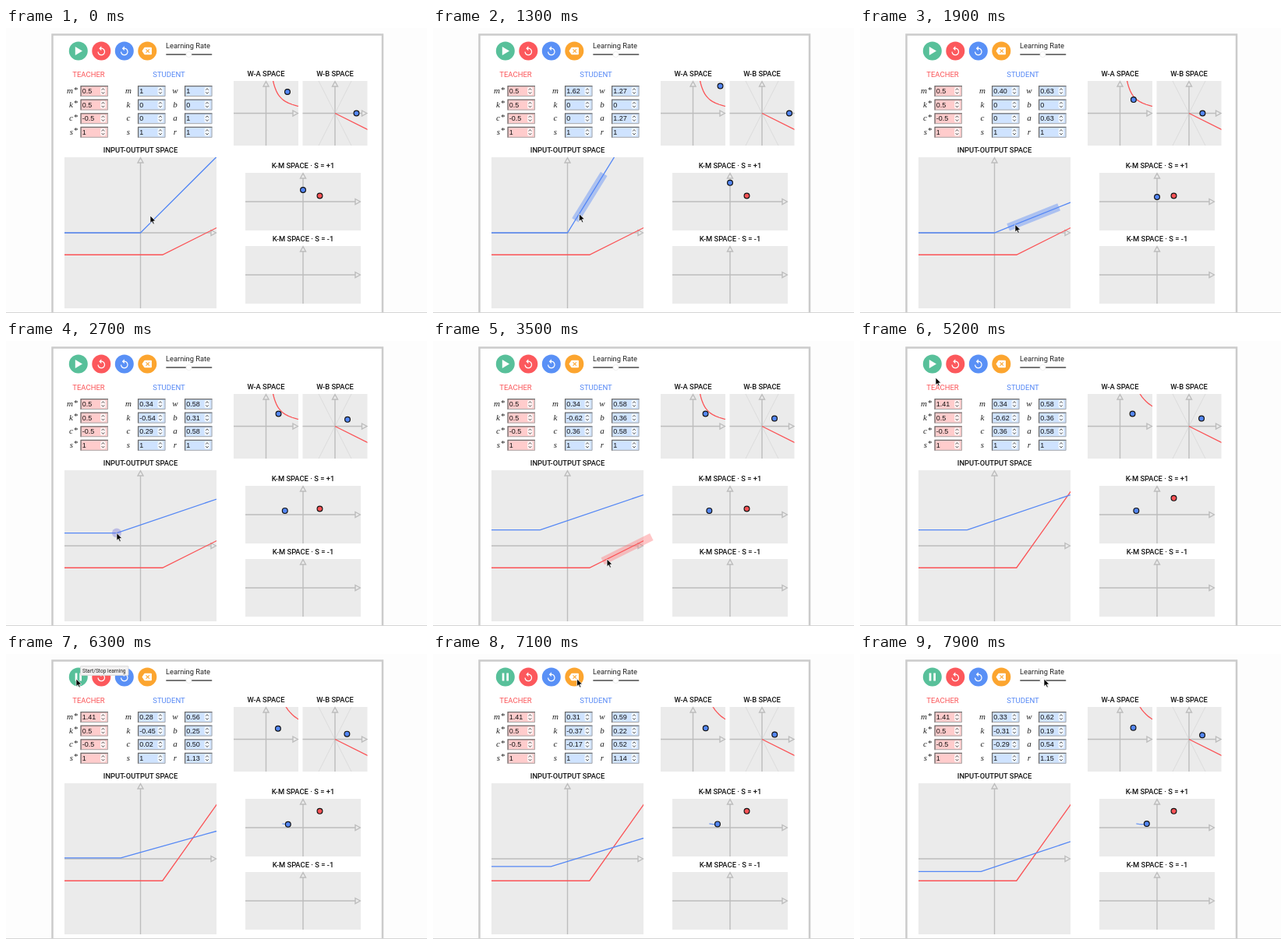
An HTML page for the animation above (8000 ms loop, 540 by 366 pixels).

```html
<!DOCTYPE html>
<html lang="en">
<head>
<meta charset="utf-8">
<title>Teacher and student</title>
<style>
html, body { margin: 0; width: 100%; height: 100%; overflow: hidden; background: #fdfdfd; }
svg { display: block; width: 540px; height: 366px; }
text { font-family: Roboto, Arial, sans-serif; font-size: 9.5px; }
.title { font-weight: 500; font-size: 9.4px; text-anchor: middle; fill: #111; }
.math { font: italic 11px "Liberation Serif", serif; fill: #222; }
.value { font: 9px "Liberation Sans", Arial, sans-serif; fill: #111; }
.axis { fill: none; stroke: #bdbdbd; stroke-width: 1.4; }
.line { fill: none; stroke-width: 1.3; }
</style>
</head>
<body>
<svg id="stage" viewBox="0 0 540 366"></svg>
<script>
const RED = '#fb5356', BLUE = '#5487f5';
const LOOP = 8000, STEP = 100, LEARN = 5500;
const stage = document.getElementById('stage');

function add(tag, attrs = {}, text = '') {
  const node = document.createElementNS('http://www.w3.org/2000/svg', tag);
  set(node, attrs);
  node.textContent = text;
  return stage.appendChild(node);
}
function set(node, attrs) {
  for (const name in attrs) node.setAttribute(name, attrs[name]);
}
const show = (node, on) => set(node, { visibility: on ? 'visible' : 'hidden' });
const label = (x, y, text, attrs) => add('text', { x, y, ...attrs }, text);
const path = (d, attrs) => add('path', { d, ...attrs });

// Plots: pixel centre, half size and pixels per unit
const plots = {
  io: { cx: 172.5, cy: 263, hw: 97.5, hh: 97, sx: 56.5, sy: 56.5, title: 'INPUT-OUTPUT SPACE' },
  wa: { cx: 333.5, cy: 109.5, hw: 41.5, hh: 41.5, sx: 27.5, sy: 27.5, title: 'W-A SPACE' },
  wb: { cx: 422, cy: 109.5, hw: 41.5, hh: 41.5, sx: 27.5, sy: 27.5, title: 'W-B SPACE' },
  plus: { cx: 381, cy: 223, hw: 74, hh: 37, sx: 43, sy: 15, title: 'K-M SPACE · S = +1' },
  minus: { cx: 381, cy: 317, hw: 74, hh: 37, sx: 43, sy: 15, title: 'K-M SPACE · S = -1' }
};
const toPixel = (plot, x, y) => [plot.cx + x * plot.sx, plot.cy - y * plot.sy];
const polyline = points => 'M' + points.map(p => p.map(v => v.toFixed(2)).join(' ')).join('L');

function drawPlot(id) {
  const { cx, cy, hw, hh, title } = plots[id];
  const left = cx - hw, right = cx + hw, top = cy - hh, bottom = cy + hh;
  const box = { x: left, y: top, width: 2 * hw, height: 2 * hh };
  add('rect', { ...box, fill: '#ebebeb' });
  const clip = add('clipPath', { id });
  clip.appendChild(add('rect', box));
  if (id === 'wb') {
    path(`M${cx - 21} ${top}L${cx + 21} ${bottom}M${cx + 21} ${top}L${cx - 21} ${bottom}`,
      { stroke: '#dcdcdc', 'stroke-width': 1 });
  }
  path(`M${left} ${cy}H${right - 7}M${cx} ${bottom}V${top + 7}` +
    `M${right - 7} ${cy - 3.5}L${right - .7} ${cy}L${right - 7} ${cy + 3.5}Z` +
    `M${cx - 3.5} ${top + 7}L${cx} ${top + .7}L${cx + 3.5} ${top + 7}Z`, { class: 'axis' });
  label(cx, top - 6, title, { class: 'title' });
}

function drawField(x, y, fill) {
  add('rect', { x, y, width: 35.5, height: 14, fill });
  path(`M${x + .6} ${y + 14}V${y + .6}H${x + 35.5}`, { fill: 'none', stroke: '#6c6c6c', 'stroke-width': 1.3 });
  path(`M${x + 35} ${y + 1}V${y + 13.5}H${x + 1}`, { fill: 'none', stroke: '#a8a8a8' });
  add('rect', { x: x + 25.5, y: y + 2, width: 7, height: 10, rx: 2, fill: '#fff', 'fill-opacity': .75 });
  path(`M${x + 27.2} ${y + 5.7}l1.8-2 1.8 2m0 2.6l-1.8 2-1.8-2`, { fill: 'none', stroke: '#444', 'stroke-width': .9 });
  return label(x + 2.3, y + 10.2, '', { class: 'value' });
}

// Card and controls
add('rect', { width: 540, height: 366, fill: '#fdfdfd' });
add('rect', { x: 59.5, y: 8.5, width: 423.5, height: 365, fill: '#fff', stroke: '#cbcbcb', 'stroke-width': 2.5 });
path('M0 365.5H540', { stroke: '#d5d5d5' });

['#58c09a', '#fc585c', '#5990f6', '#fca52f'].forEach((fill, i) =>
  add('circle', { cx: 92.8 + i * 29.5, cy: 29.5, r: 12, fill }));
const playIcon = path('M88.8 24V35L98 29.5Z', { fill: '#fff' });
const pauseIcon = path('M88.7 24.5h2.7v10h-2.7zM94.3 24.5h2.7v10h-2.7z', { fill: '#fff' });
const replay = 'M12 5V1L7 6l5 5V7c3.3 0 6 2.7 6 6s-2.7 6-6 6-6-2.7-6-6H4c0 4.4 3.6 8 8 8s8-3.6 8-8-3.6-8-8-8z';
[122.3, 151.8].forEach(x =>
  path(replay, { fill: '#fff', transform: `translate(${x} 29.5) scale(.6) translate(-12 -11.5)` }));
path('M22 3H7Q6 3 5.4 3.9L0 12l5.4 8.1Q6 21 7 21h15a2 2 0 0 0 2-2V5a2 2 0 0 0-2-2zm-3 12.6L17.6 17 ' +
  '14 13.4 10.4 17 9 15.6l3.6-3.6L9 8.4 10.4 7l3.6 3.6L17.6 7 19 8.4 15.4 12z',
  { fill: '#fff', transform: 'translate(180.7 29.5) scale(.52) translate(-12 -12)' });

label(205, 26, 'Learning Rate', { 'font-size': 9.3, style: 'font-size:9.3px', fill: '#222' });
path('M206 34H263.5', { stroke: '#777', 'stroke-width': 1.8, 'stroke-linecap': 'round' });
add('circle', { cx: 234.5, cy: 34, r: 3.6, fill: '#fff', stroke: '#e4e4e4', 'stroke-width': .6 });

label(106, 63, 'TEACHER', { fill: RED, 'text-anchor': 'middle' });
label(209, 63, 'STUDENT', { fill: BLUE, 'text-anchor': 'middle' });

const fields = {};
function drawColumn(names, x, fill, star) {
  names.forEach((name, i) => {
    const y = 74 + i * 17.6;
    label(x - (star ? 9.5 : 12), y + 10, name, { class: 'math', 'text-anchor': star ? 'end' : 'middle' });
    if (star) label(x - 9, y + 8.5, '*', { class: 'math' });
    fields[name + star] = drawField(x, y, fill);
  });
}
drawColumn(['m', 'k', 'c', 's'], 95.5, '#ffcccc', '*');
drawColumn(['m', 'k', 'c', 's'], 169, '#cfe3ff', '');
drawColumn(['w', 'b', 'a', 'r'], 229, '#cfe3ff', '');

Object.keys(plots).forEach(drawPlot);

// Moving parts
const curve = (id, stroke) => path('', { class: 'line', stroke, 'clip-path': `url(#${id})` });
const dot = fill => add('circle', { r: 3.4, fill, stroke: '#111', 'stroke-width': 1.2 });
const band = stroke => path('', { stroke, 'stroke-width': 10, 'stroke-opacity': .42 });
const studentBand = band(BLUE), teacherBand = band('#ff7779');
const teacherLine = curve('io', RED), studentLine = curve('io', BLUE);
const kneeMark = add('circle', { r: 6, fill: '#6868d8', 'fill-opacity': .36 });
const hyperbola = curve('wa', RED), ratioLine = curve('wb', RED);
const trails = ['wa', 'wb', 'plus'].map(id => curve(id, '#6f9bf5'));
const teacherDot = dot(RED);
const studentDots = trails.map(() => dot(BLUE));
const tip = [
  add('rect', { x: 95.5, y: 15.5, width: 61.5, height: 12, rx: 1, fill: '#f2f1f1', stroke: '#d2d2d2', 'stroke-width': .7 }),
  label(98, 23.6, 'Start/Stop learning', { style: 'font-size:6.6px', fill: '#222' })
];
const cursor = path('M0 0V9.6L2.2 7.6 3.8 11.1 5.3 10.4 3.8 7 6.8 6.8Z',
  { fill: '#000', stroke: '#fff', 'stroke-width': .7 });

// Keys are [time, value, value, ...]
function track(t, keys, ease = u => u) {
  if (t <= keys[0][0]) return keys[0].slice(1);
  const i = keys.findIndex(key => key[0] > t);
  if (i < 0) return keys[keys.length - 1].slice(1);
  const from = keys[i - 1], to = keys[i];
  const u = ease((t - from[0]) / (to[0] - from[0]));
  return from.slice(1).map((v, j) => v + (to[j + 1] - v) * u);
}
const smooth = u => u * u * (3 - 2 * u);

function student(t) {
  if (t >= LEARN) {
    const [w, a, b, r] = track(t, [[LEARN - 100, .583, .583, .361, 1], [5900, .562, .525, .295, 1.09],
      [6300, .56, .5, .25, 1.13], [7900, .62, .54, .19, 1.15]]);
    const c = -.45 + .81 * Math.exp(-.00067 * (t - LEARN + 10));
    return { w, a, b, r, c, m: w * a, k: -b / w, s: 1 };
  }
  const [m] = track(t, [[500, 1], [900, 1.27], [1300, 1.62], [1500, 1.8], [1800, .46], [2000, .34]]);
  const [k, c] = track(t, [[2300, 0, 0], [2700, -.54, .29], [2900, -.62, .36]]);
  const w = Math.sqrt(m);
  return { m, k, c, s: 1, w, a: w, b: -k * w, r: 1 };
}
function teacher(t) {
  return { m: track(t, [[3600, .5], [4400, 1.41]], smooth)[0], k: .5, c: -.5, s: 1 };
}

const knee = unit => toPixel(plots.io, unit.k, unit.c);
function along(unit, distance) {
  const [x, y] = knee(unit), angle = Math.atan(unit.m);
  return [x + distance * Math.cos(angle), y - distance * Math.sin(angle)];
}
function pointer(t, pupil, master) {
  if (t >= 500 && t <= 2000) return along(pupil, 28.5);
  if (t >= 2300 && t <= 2900) return knee(pupil);
  if (t >= 3500 && t <= 4400) return along(master, 25);
  return track(t, [[0, 185, 241], [500, ...along(student(500), 28.5)],
    [2000, ...along(student(2000), 28.5)], [2300, ...knee(student(2300))],
    [2900, ...knee(student(2900))], [3500, ...along(teacher(3500), 25)],
    [4400, ...along(teacher(4400), 25)], [4600, ...along(teacher(4400), 25)],
    [5200, 97, 47], [5400, 90, 32], [6500, 90, 32], [7500, 236, 32]], smooth);
}

const response = unit => polyline([toPixel(plots.io, -2, unit.c), knee(unit),
  toPixel(plots.io, unit.k + 3, unit.c + 3 * unit.m)]);
const bandPath = unit => polyline([along(unit, 19), along(unit, 89)]);
const places = unit => [
  toPixel(plots.wa, unit.w, unit.a),
  toPixel(plots.wb, unit.w, unit.b),
  toPixel(plots.plus, unit.k, unit.m)
];
const place = (node, [cx, cy]) => set(node, { cx, cy });
const format = v => Number.isInteger(v) ? String(Math.abs(v) && v) : v.toFixed(2);

function render(t) {
  const pupil = student(t), master = teacher(t), learning = t >= LEARN;

  for (const name in pupil) fields[name].textContent = format(pupil[name]);
  for (const name in master) fields[name + '*'].textContent = Number(master[name].toFixed(2));

  set(studentLine, { d: response(pupil) });
  set(teacherLine, { d: response(master) });
  set(studentBand, { d: bandPath(pupil) });
  set(teacherBand, { d: bandPath(master) });
  show(studentBand, t >= 400 && t <= 2000);
  show(teacherBand, t >= 3400 && t <= 4600);
  place(kneeMark, knee(pupil));
  show(kneeMark, t >= 2200 && t <= 2900);

  const arc = Array.from({ length: 31 }, (_, i) => {
    const w = .2 * 1.09 ** i;
    return toPixel(plots.wa, w, master.m / w);
  });
  set(hyperbola, { d: polyline(arc) });
  set(ratioLine, { d: polyline([toPixel(plots.wb, 0, 0), toPixel(plots.wb, 2, -2 * master.k)]) });
  place(teacherDot, toPixel(plots.plus, master.k, master.m));

  const history = [];
  for (let s = LEARN - 100; s <= t; s += STEP) history.push(places(student(s)));
  places(pupil).forEach((p, i) => {
    place(studentDots[i], p);
    set(trails[i], { d: learning ? polyline(history.map(h => h[i])) : '' });
  });

  show(playIcon, !learning);
  show(pauseIcon, learning);
  tip.forEach(node => show(node, t >= 5400 && t < 6600));
  set(cursor, { transform: `translate(${pointer(t, pupil, master)})` });
}

const start = performance.now();
function tick(now) {
  const t = Math.max(0, now - start) % LOOP;
  render(Math.floor(t / STEP) * STEP);
  requestAnimationFrame(tick);
}
tick(start);
</script>
</body>
</html>
```
